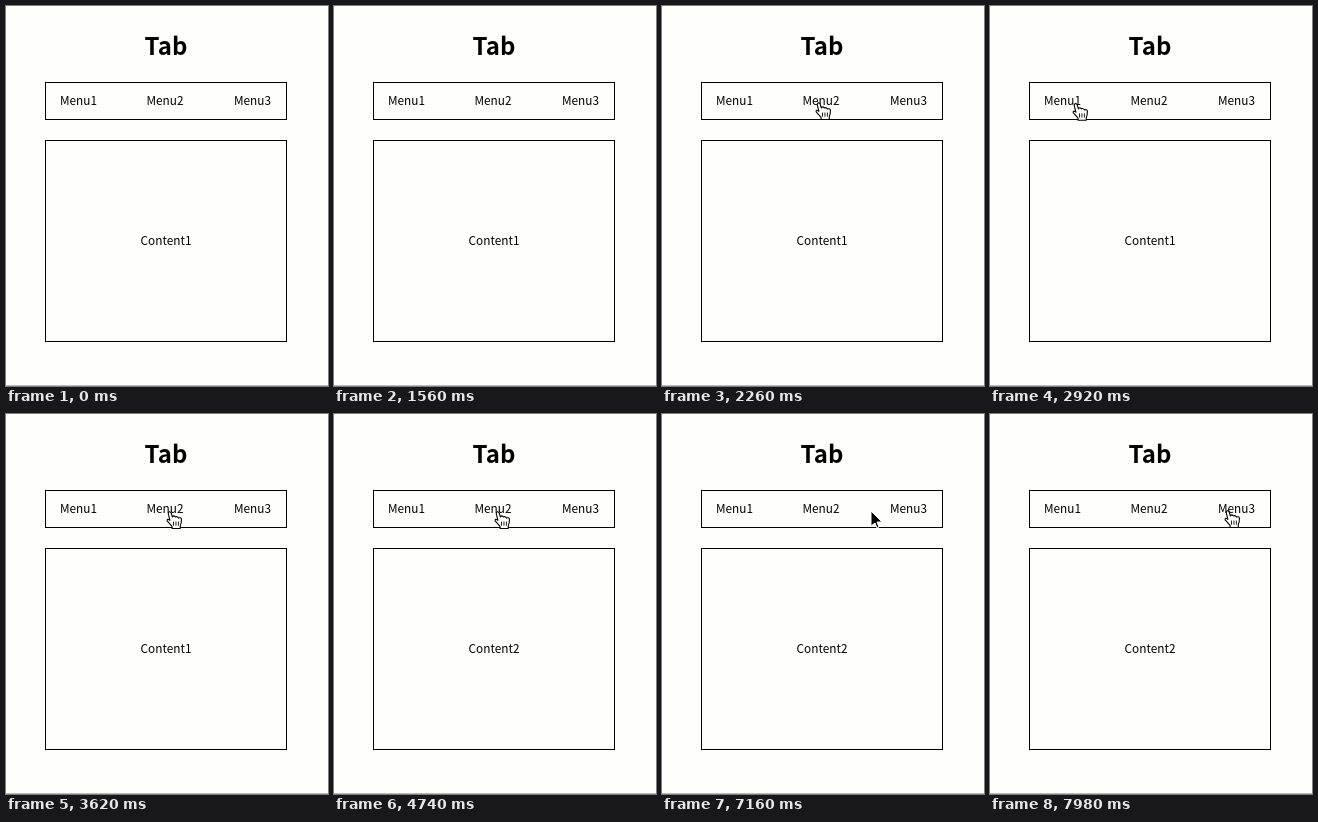
An HTML page that plays this animation: 322 by 380 pixels, repeating every 8 s.

```html
<!DOCTYPE html>
<html lang="en">
<head>
<meta charset="utf-8">
<title>Tab</title>
<style>
  html, body { margin: 0; width: 100%; height: 100%; overflow: hidden; background: #fefefa; }
  svg { display: block; font: 11.8px "Noto Sans CJK KR", "Noto Sans CJK JP", sans-serif; }
  .box { fill: none; stroke: #000; }
  .title { font-size: 24px; font-weight: 700; }
</style>
</head>
<body>
<svg width="322" height="380" viewBox="0 0 322 380">
  <g text-anchor="middle">
    <text class="title" x="160" y="49">Tab</text>
    <text x="72.5" y="98.5">Menu1</text>
    <text x="159" y="98.5">Menu2</text>
    <text x="246.5" y="98.5">Menu3</text>
    <text id="content" x="160" y="238.5">Content1</text>
  </g>
  <rect class="box" x="39.5" y="76.5" width="241" height="37"/>
  <rect class="box" x="39.5" y="134.5" width="241" height="201"/>
  <path d="M0 379.5H322" stroke="#bbb"/>
  <g id="cursor">
    <path id="arrow" d="M0 0V15L4 12L6 17L8 16L6 11H11Z" stroke="#fff"/>
    <g id="hand" transform="translate(0 -.5) scale(1.1)" fill="#fefefa" stroke="#000" stroke-linejoin="round" stroke-linecap="round">
      <path d="M-1 8L-2.5 2Q-2 -1 0 1L1.3 5Q2.5 3 4 5Q5.5 4 7 6Q9 5 9.5 7Q9.5 11 8.4 13V15.4H1V13.5L-3.5 8.5Q-4 6 -1 8Z"/>
      <path d="M2.3 9.5v3m2.2-3v3m2.2-3v3" stroke-width=".8"/>
    </g>
  </g>
</svg>
<script>
  const LOOP = 8000, CLICK = 4740;
  const START = { x: 189, y: -19 };
  const moves = [
    { from: 1540, to: 2260, x: 158, y: 97 },
    { from: 2380, to: 3100, x: 74, y: 98 },
    { from: 3200, to: 3620, x: 165, y: 98 },
    { from: 5460, to: 5760, x: 164, y: 96 },
    { from: 6280, to: 7160, x: 209, y: 97 },
    { from: 7260, to: 7860, x: 239, y: 97 }
  ];
  const [content, cursor, arrow, hand] =
    ["content", "cursor", "arrow", "hand"].map(id => document.getElementById(id));
  const clamp = u => Math.min(1, Math.max(0, u));
  const ease = u => u * u * (3 - 2 * u);

  // Each move carries the pointer from wherever the previous one left it.
  function pointerAt(t) {
    return moves.reduce((p, m) => {
      const k = ease(clamp((t - m.from) / (m.to - m.from)));
      return { x: p.x + (m.x - p.x) * k, y: p.y + (m.y - p.y) * k };
    }, START);
  }

  // Menu labels are evenly spaced along the bar.
  const overMenu = ({ x, y }) =>
    Math.abs(y - 94) < 10 && [0, 1, 2].some(i => Math.abs(x - 72.5 - 87 * i) < 20);

  function draw(now) {
    const t = now % LOOP, p = pointerAt(t), hover = overMenu(p);
    content.textContent = t < CLICK ? "Content1" : "Content2";
    cursor.setAttribute("transform", `translate(${p.x} ${p.y})`);
    arrow.style.display = hover ? "none" : "";
    hand.style.display = hover ? "" : "none";
    requestAnimationFrame(draw);
  }
  draw(performance.now());
</script>
</body>
</html>
```
